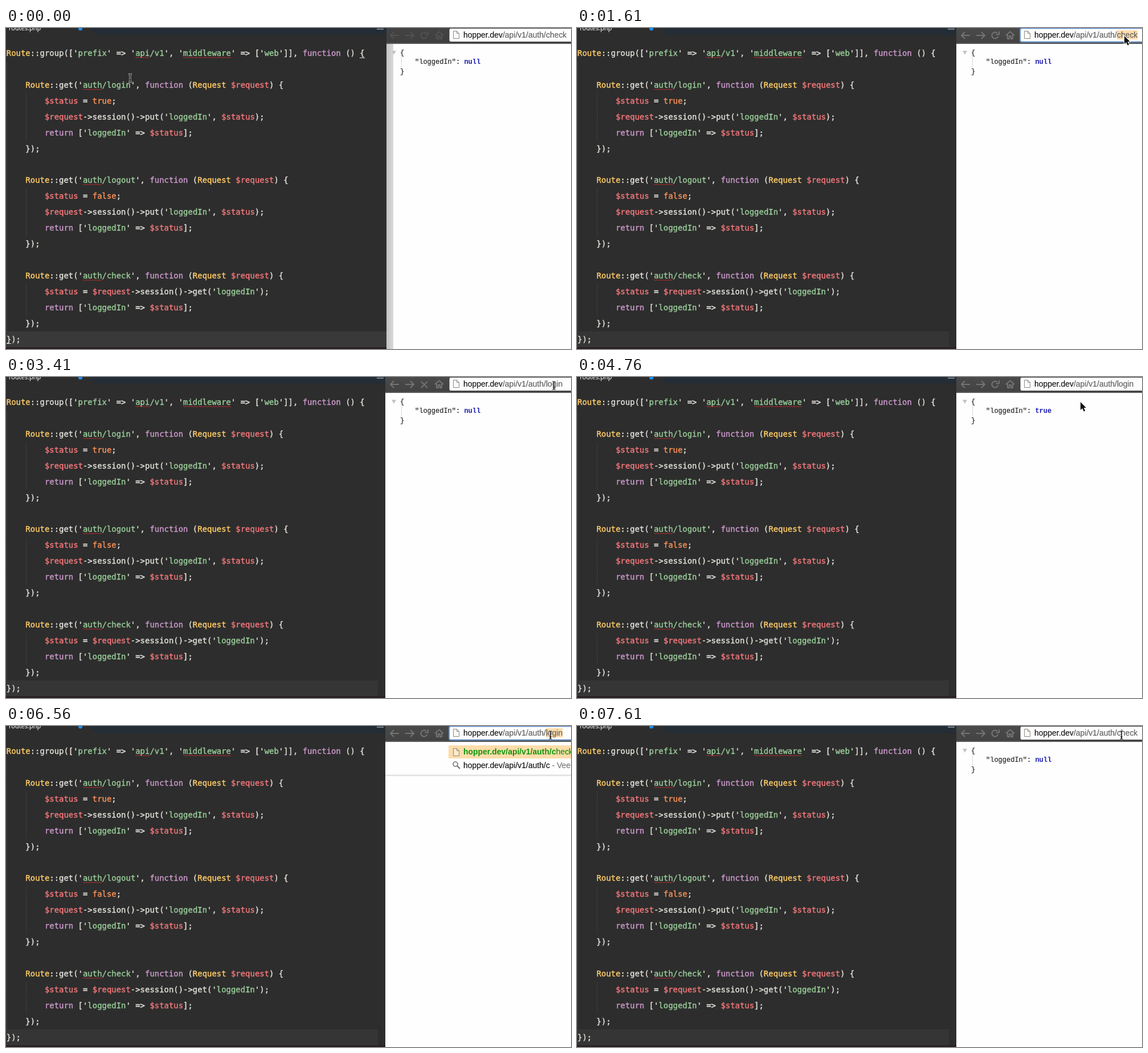
Recreate the animation shown at these times as an HTML page with a canvas. Size 992x564 px, loop 8 s.

```html
<!DOCTYPE html>
<html lang="en">
<head>
<meta charset="utf-8">
<title>Session check</title>
<style>
html, body { margin: 0; width: 100%; height: 100%; overflow: hidden; background: #2d2d2d; }
canvas { display: block; width: 992px; height: 564px; }
</style>
</head>
<body>
<canvas id="stage" width="992" height="564"></canvas>
<script>
const ctx = document.getElementById('stage').getContext('2d');
const LOOP = 8000, LEFT = 0.8, COL = 8.386, ROW = 27.93;
const MONO = '13.95px "DejaVu Sans Mono", monospace';
const SANS = '13.95px "Liberation Sans", Arial, sans-serif';
const JSON_FONT = '12px "Liberation Mono", "Courier New", monospace';
const SELECTION = '#ffdcaa';
const BASE = 'hopper.dev/api/v1/auth/';
const FG = '#e2e0da', GREEN = '#99cc99';

const block = (name, status, body) => [
  `    Route::get('auth/${name}', function (Request $request) {`,
  `        $status = ${status};`,
  ...body,
  "        return ['loggedIn' => $status];",
  '    });'
];
const put = ["        $request->session()->put('loggedIn', $status);"];
const code = [
  "Route::group(['prefix' => 'api/v1', 'middleware' => ['web']], function () {", '',
  ...block('login', 'true', put), '',
  ...block('logout', 'false', put), '',
  ...block('check', "$request->session()->get('loggedIn')", []),
  '});'
];

const tokenRules = [
  [/^(Route|Request)$/, '#ffcc66'],
  [/^(function|return)$/, '#cc99cc'],
  [/^(true|false)$/, '#f99157'],
  [/^\$/, '#f2777a']
];
const tokenColor = word => (tokenRules.find(([rule]) => rule.test(word)) || [0, FG])[1];

// Each entry changes part of the state and holds until the next one.
const timeline = [
  [0, { focused: false, ring: false, word: 'check', from: -1, to: -1, typed: '', hint: '', value: 'null', loading: false, ghost: false }],
  [740, { ghost: true }],
  [1460, { focused: true, ring: true, ghost: false, from: 0, to: 28 }],
  [1610, { from: 23 }],
  [2660, { word: 'login', typed: 'l', hint: 'login', from: 24 }],
  [2810, { typed: 'lo', from: 25 }],
  [2960, { typed: 'logi', from: 27 }],
  [3110, { typed: 'login', from: -1 }],
  [3410, { typed: '', ring: false, loading: true }],
  [3710, { value: 'true' }],
  [3860, { loading: false }],
  [5360, { ring: true }],
  [5510, { from: 0 }],
  [5660, { from: 23 }],
  [6560, { typed: 'c', hint: 'check' }],
  [6710, { word: 'check', typed: 'ch', from: 25 }],
  [6860, { typed: 'che', from: 26 }],
  [7010, { typed: 'check', from: -1 }],
  [7160, { typed: '', ring: false, loading: true }],
  [7610, { loading: false, value: 'null' }]
];
const pointer = [
  [0, 218, 88, 'beam'], [140, 172, 120, 'beam'], [440, 225, 116, 'beam'],
  [590, 430, 106, 'beam'], [740, 694, 82, 'arrow'], [890, 880, 36, 'arrow'],
  [1030, 946, 18, 'arrow'], [1180, 960, 14, 'arrow'], [1320, 961, 14, 'arrow'],
  [3410, 962, 15, 'beam'], [4160, 919, 29, 'arrow'], [4310, 874, 43, 'arrow'],
  [4760, 884, 44, 'arrow'], [4910, 910, 33, 'arrow'], [5060, 940, 21, 'beam'],
  [5210, 956, 16, 'beam']
];

function rect(x, y, w, h, color) {
  ctx.fillStyle = color;
  ctx.fillRect(x, y, w, h);
}

// A positive weight thickens the glyphs with a thin outline.
function text(str, x, y, font, color, weight = 0) {
  ctx.font = font;
  ctx.fillStyle = color;
  ctx.fillText(str, x, y);
  if (weight) {
    ctx.strokeStyle = color;
    ctx.lineWidth = weight;
    ctx.strokeText(str, x, y);
  }
  return x + ctx.measureText(str).width;
}

function widthOf(str, font) {
  ctx.font = font;
  return ctx.measureText(str).width;
}

function path(points, color, width = 2) {
  ctx.beginPath();
  points.forEach(([x, y]) => ctx.lineTo(x, y));
  ctx.strokeStyle = color;
  ctx.lineWidth = width;
  ctx.stroke();
}

function dotted(x, top, bottom, color) {
  for (let y = top; y < bottom; y += 2) rect(x, y, 1, 1, color);
}

function squiggle(x, y, width) {
  for (let i = 0; i < width; i += 2) rect(x + i, y + (i / 2) % 2, 2, 1, '#b82c2c');
}

function codeLine(line, baseline) {
  const at = col => LEFT + col * COL;
  const put = (str, col, color) => text(str, at(col), baseline, MONO, color, 0.4);
  for (const m of line.matchAll(/'[^']*'|\$?\w+|[^\s\w$']+/g)) {
    const word = m[0], col = m.index;
    if (word[0] === "'") {
      put("'", col, FG);
      put(word.slice(1, -1), col + 1, GREEN);
      put("'", col + word.length - 1, FG);
    } else {
      put(word, col, tokenColor(word));
    }
  }
  for (const m of line.matchAll(/\b(api|auth|middleware)\b/g))
    squiggle(Math.round(at(m.index)), Math.round(baseline) + 2, m[0].length * COL);
}

function editor(s) {
  const right = s.focused ? 666 : 668;
  rect(0, 0, right, 564, '#2d2d2d');
  const bar = ctx.createLinearGradient(0, 0, 0, 13);
  bar.addColorStop(0, '#222d37');
  bar.addColorStop(1, '#262d33');
  ctx.fillStyle = bar;
  ctx.beginPath();
  ctx.moveTo(149, 0);
  ctx.quadraticCurveTo(154, 12, 164, 13);
  ctx.lineTo(right, 13);
  ctx.lineTo(right, 0);
  ctx.fill();
  text('routes.php', 5, 4, '11px "Open Sans", sans-serif', '#dedede', 0.3);
  ctx.fillStyle = '#1c91f2';
  ctx.beginPath();
  ctx.arc(130.5, 1, 3.5, 0, 7);
  ctx.fill();
  rect(651, 1, 12, 2, '#74808c');

  rect(0, 533, s.focused ? 653 : right, 28, s.focused ? '#353535' : '#393939');
  rect(0, 561, right, 3, '#281f22');
  dotted(1, 60, 533, '#4b4b4b');
  for (const [top, bottom] of [[115, 199], [283, 367], [450, 506]]) dotted(35, top, bottom, '#4b4b4b');
  code.forEach((line, i) => codeLine(line, 49 + i * ROW));
  if (!s.focused) {
    rect(621, 52, 9, 1, FG);
    rect(1, 554, 8, 1, FG);
  }
}

function fileIcon(x, y, fill) {
  ctx.beginPath();
  ctx.moveTo(x, y);
  ctx.lineTo(x + 6, y);
  ctx.lineTo(x + 10, y + 4);
  ctx.lineTo(x + 10, y + 13);
  ctx.lineTo(x, y + 13);
  ctx.closePath();
  ctx.fillStyle = fill;
  ctx.fill();
  ctx.strokeStyle = '#8d8780';
  ctx.lineWidth = 1;
  ctx.stroke();
  path([[x + 6, y], [x + 6, y + 4], [x + 10, y + 4]], '#8d8780', 1);
}

function toolbarIcons(color, loading) {
  for (const [x, dir] of [[675, 1], [716, -1]]) {
    path([[x + 6 * dir, 7], [x, 13], [x + 6 * dir, 19]], color);
    path([[x, 13], [x + 15 * dir, 13]], color);
  }
  if (loading) {
    path([[729, 8], [740, 19]], color);
    path([[740, 8], [729, 19]], color);
  } else {
    ctx.beginPath();
    ctx.arc(734, 13, 5.5, 0.3, 5.5);
    ctx.strokeStyle = color;
    ctx.lineWidth = 2;
    ctx.stroke();
    path([[741, 6], [741, 11.5], [735.5, 11.5]], color);
  }
  path([[753, 13], [760.5, 6.5], [768, 13]], color);
  path([[756, 12], [756, 19], [759, 19], [759, 14], [762, 14], [762, 19], [765, 19], [765, 12]], color);
}

function toolbar(s) {
  const left = s.focused ? 666 : 668;
  const shade = ctx.createLinearGradient(0, 0, 0, 28);
  shade.addColorStop(0, s.focused ? '#4a4a4a' : '#434343');
  shade.addColorStop(1, s.focused ? '#424242' : '#3f3f3f');
  rect(left, 0, 992 - left, 28, shade);
  rect(left, 26, 992 - left, 2, '#5a5a5a');
  toolbarIcons(s.focused ? '#747474' : '#525252', s.loading);

  ctx.beginPath();
  ctx.roundRect(778, 0.5, 230, 24, 3);
  ctx.fillStyle = '#fefefe';
  ctx.fill();
  ctx.strokeStyle = s.ring ? '#648fc4' : '#303030';
  ctx.lineWidth = s.ring ? 2 : 1;
  ctx.stroke();
  fileIcon(785.5, 5.5, '#fafafa');

  const url = BASE + s.word;
  if (s.from >= 0) {
    const start = 803 + widthOf(url.slice(0, s.from), SANS);
    rect(start, 4, widthOf(url.slice(s.from, s.to), SANS), 16, SELECTION);
  }
  const x = text('hopper.dev', 803, 17, SANS, '#181818', 0.2);
  text(url.slice(10), x, 17, SANS, '#606060', 0.2);
}

function page(s) {
  rect(666, 28, 326, 536, '#fefefe');
  if (!s.focused) {
    const edge = ctx.createLinearGradient(668, 0, 680, 0);
    edge.addColorStop(0, '#c3c3c3');
    edge.addColorStop(1, '#d8d8d8');
    rect(666, 28, 14, 536, edge);
    rect(666, 28, 2, 536, '#2d2d2d');
  }
  if (s.ghost) {
    const fade = ctx.createLinearGradient(680, 0, 697, 0);
    fade.addColorStop(0, '#dadada');
    fade.addColorStop(1, '#f0f0f0');
    rect(680, 69, 17, 40, fade);
    rect(697, 89, 26, 19, '#fbfbfb');
  }
  ctx.fillStyle = '#c4c4c4';
  ctx.beginPath();
  ctx.moveTo(677, 40);
  ctx.lineTo(685, 40);
  ctx.lineTo(681, 47);
  ctx.fill();
  dotted(694, 51, 69, '#b5b5b5');
  text('{', 692, 47, JSON_FONT, '#222', 0.2);
  text('"loggedIn":', 718, 63, JSON_FONT, '#222', 0.2);
  text(s.value, 804.4, 63, 'bold ' + JSON_FONT, '#1a1ab0');
  text('}', 692, 80, JSON_FONT, '#222', 0.2);
}

function suggestions(s) {
  rect(666, 28, 326, 60, '#fefefe');
  rect(666, 85, 326, 1, '#ededed');
  rect(666, 86, 326, 2, '#e2e2e2');
  rect(777, 34, 215, 23, SELECTION);
  fileIcon(785.5, 39.5, '#ffe9ca');
  const x = text(BASE + s.typed, 803, 50, 'bold ' + SANS, '#0b960b');
  text(s.hint.slice(s.typed.length), x, 50, SANS, '#0b960b', 0.2);
  ctx.beginPath();
  ctx.arc(789, 67, 4, 0, 7);
  ctx.strokeStyle = '#777';
  ctx.lineWidth = 1.7;
  ctx.stroke();
  path([[792, 70], [797, 75]], '#777', 2.2);
  const end = text(BASE + s.typed, 803, 74, SANS, '#151515', 0.2);
  text(' - Veeno Search', end, 74, SANS, '#777', 0.2);
}

function beam(x, y) {
  const strokes = (color, width) => {
    path([[x - 3, y - 7], [x - 1, y - 7], [x, y - 6], [x, y + 6], [x - 1, y + 7], [x - 3, y + 7]], color, width);
    path([[x + 3, y - 7], [x + 1, y - 7], [x, y - 6], [x, y + 6], [x + 1, y + 7], [x + 3, y + 7]], color, width);
    path([[x - 2, y + 3], [x + 2, y + 3]], color, width);
  };
  strokes('rgba(255,255,255,.8)', 2.6);
  strokes('#161616', 1.1);
}

function arrow(x, y) {
  ctx.beginPath();
  [[0, 0], [0, 14], [3.3, 11], [5.8, 16.5], [8.2, 15.4], [5.8, 10], [10, 10]]
    .forEach(([dx, dy]) => ctx.lineTo(x + dx, y + dy));
  ctx.closePath();
  ctx.strokeStyle = '#fff';
  ctx.lineWidth = 2;
  ctx.stroke();
  ctx.fillStyle = '#111';
  ctx.fill();
}

function draw(now) {
  const t = now % LOOP;
  const state = Object.assign({}, ...timeline.filter(([at]) => at <= t).map(([, change]) => change));
  ctx.lineJoin = 'round';
  page(state);
  editor(state);
  toolbar(state);
  if (state.typed) suggestions(state);
  const [, x, y, kind] = pointer.findLast(([at]) => at <= t);
  (kind === 'beam' ? beam : arrow)(x, y);
}

const began = performance.now();
function tick() {
  draw(performance.now() - began);
  requestAnimationFrame(tick);
}
tick();
</script>
</body>
</html>
```
